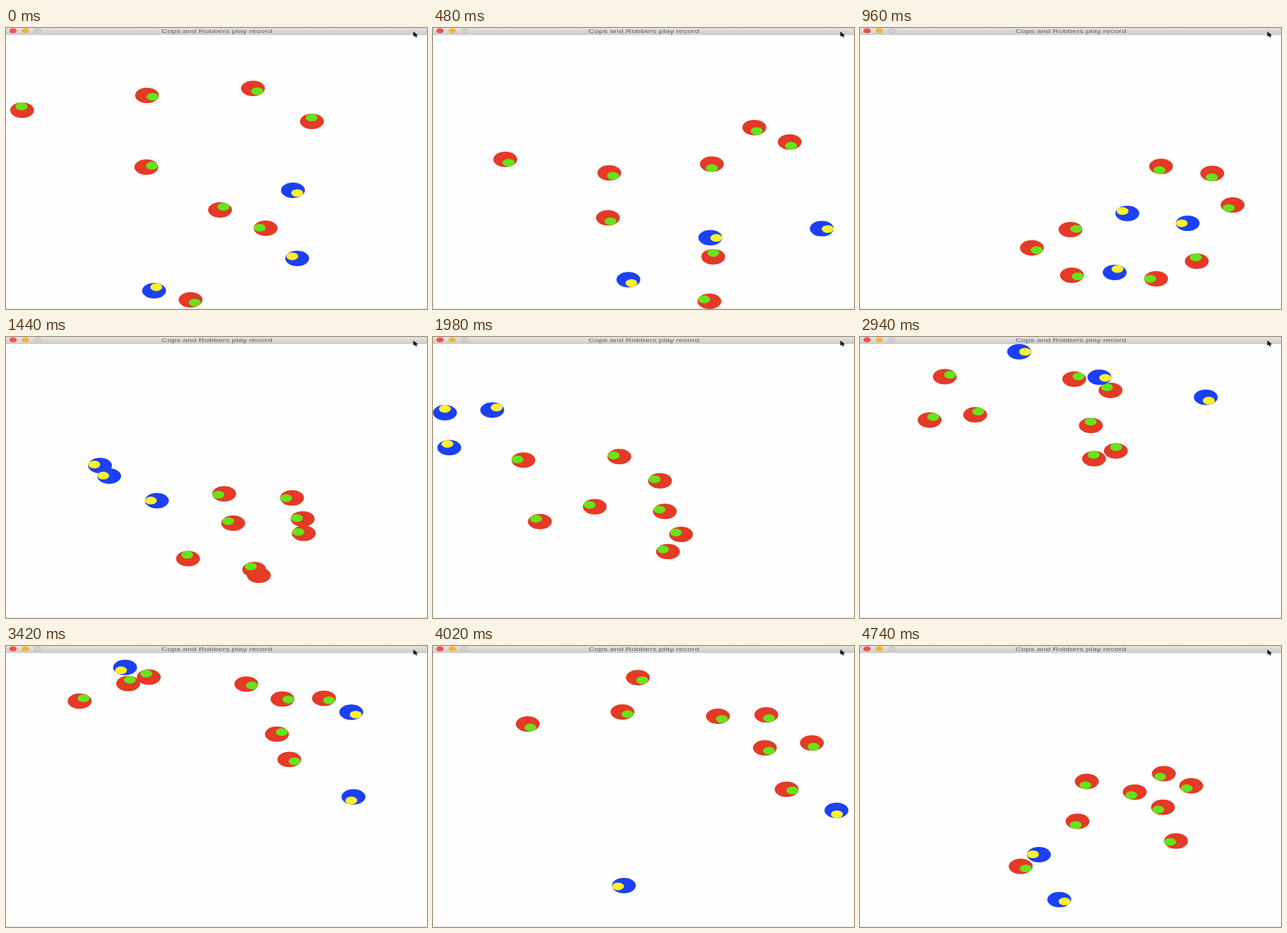
Animation, 600 px wide and 400 px high, one loop 4.8 s. Source, as an HTML page with a canvas:

```html
<!DOCTYPE html>
<html>
<head>
<meta charset="utf-8">
<title>Cops and Robbers play record</title>
<style>
html, body { margin: 0; width: 100%; height: 100%; overflow: hidden; background: #fefefe; }
canvas { display: block; }
</style>
</head>
<body>
<canvas id="stage" width="600" height="400"></canvas>
<script>
const ctx = document.getElementById('stage').getContext('2d');
const LOOP = 4800, STEP = 60, LAST = LOOP - STEP;
const RX = 17, RY = 11;

// Speeds are in body radii per millisecond.
const ROBBER_SPEED = 2 / STEP, COP_SPEED = 0.9 / STEP;
const CAUGHT_AT = 3540;

const clamp = (v, lo, hi) => Math.min(hi, Math.max(lo, v));
const unit = deg => [Math.cos(deg * Math.PI / 180), Math.sin(deg * Math.PI / 180)];
const normal = ([x, y]) => {
  const length = Math.hypot(x, y) || 1;
  return [x / length, y / length];
};

// Robbers run through a few poses: x, y, heading in degrees.
const ROBBER_TIMES = [0, 960, 1440, 2520, 4020, LAST];
const robbers = [
  [[415, 328, 214], [381, 264, 218], [134, 183, 195], [335, 42, 355], [272, 341, 168], [284, 361, 28]],
  [[211, 374, 292], [363, 348, 300], [147, 198, 185], [140, 40, 8], [575, 234, 85], [255, 297, 185]],
  [[409, 231, 45], [467, 278, 180], [215, 233, 180], [123, 40, 335], [81, 182, 90]]
].map((poses, i) => ({
  times: ROBBER_TIMES,
  path: poses,
  headings: poses.map(pose => unit(pose[2])),
  speed: ROBBER_SPEED,
  end: i === 2 ? CAUGHT_AT : LOOP
}));

// Cubic curve through the way points, leaving each along its heading.
function positionAt({ times, path, headings, speed }, t) {
  let i = 0;
  while (i < path.length - 2 && t >= times[i + 1]) i++;
  const span = times[i + 1] - times[i];
  const u = (t - times[i]) / span, v = 1 - u;
  const blend = (axis, radius) =>
    path[i][axis] * v * v * (1 + 2 * u) + path[i + 1][axis] * u * u * (3 - 2 * u) +
    span * speed * radius * u * v * (headings[i][axis] * v - headings[i + 1][axis] * u);
  return [clamp(blend(0, RX), RX, 600 - RX), clamp(blend(1, RY), 21, 400 - RY)];
}

// Directions are measured in body radii, as the whole scene is squashed.
const direction = (from, to) => [(to[0] - from[0]) / RX, (to[1] - from[1]) / RY];

function facingNearest(point, t) {
  const ways = robbers.filter(r => t < r.end).map(r => direction(point, positionAt(r, t)));
  return normal(ways.reduce((a, b) => Math.hypot(...b) < Math.hypot(...a) ? b : a));
}

// In the last leg the flock draws together and drops, most on its left side.
const closeIn = ([x, y]) => [x + 0.4 * (370 - x), y + 250 - 0.35 * x];

// Cops know their start pose and where they gather; the chase gives the rest.
const COP_TIMES = [0, 960, 2520, 4020, LAST];
const cops = [
  [[23, 117, 264], [245, 313], [90, 180], [135, 111]],
  [[201, 96, 20], [300, 287], [158, 183], [292, 45]],
  [[352, 86, 45], [502, 207], [248, 94], [406, 100]],
  [[436, 133, 268], [531, 252], [302, 121], [540, 138]],
  [[200, 198, 340], [302, 352], [311, 238], [473, 145]],
  [[305, 259, 305], [429, 197], [73, 96], [270, 94]],
  [[370, 285, 187], [480, 332], [294, 192], [475, 98]],
  [[263, 387, 45], [422, 357], [361, 206], [504, 204]]
].map(points => {
  const path = [...points, closeIn(points[3])];
  const headings = path.map((p, i) => i ? facingNearest(p, COP_TIMES[i]) : unit(p[2]));
  return { times: COP_TIMES, path, headings, speed: COP_SPEED };
});

function robberHeading(robber, t) {
  if (t === 0) return robber.headings[0];
  return normal(direction(positionAt(robber, t - 20), positionAt(robber, Math.min(t + 20, LAST))));
}

// Cops turn with a short lag: average where they wanted to look recently.
function copHeading(cop, t) {
  const sum = [0, 0];
  for (let past = t; past >= t - 2 * STEP; past -= STEP) {
    const [dx, dy] = past <= 0 ? cop.headings[0] : facingNearest(positionAt(cop, past), past);
    sum[0] += dx;
    sum[1] += dy;
  }
  return normal(sum);
}

function ellipse(x, y, rx, ry, color) {
  ctx.fillStyle = color;
  ctx.beginPath();
  ctx.ellipse(x, y, rx, ry, 0, 0, 2 * Math.PI);
  ctx.fill();
}

function drawPlayer([x, y], [dx, dy], body, eye) {
  ellipse(x, y, RX, RY, body);
  ellipse(x + dx * RX / 2, y + dy * RY / 2, RX / 2, RY / 2, eye);
}

function drawTitleBar() {
  const shade = ctx.createLinearGradient(0, 0, 0, 10);
  shade.addColorStop(0, '#e4e4e4');
  shade.addColorStop(1, '#cbcbcb');
  ctx.fillStyle = shade;
  ctx.fillRect(0, 0, 600, 10);

  ellipse(10, 4, 5.3, 3.5, '#f0504a');
  ellipse(27.5, 4, 5.3, 3.5, '#f5b432');
  ellipse(45, 4, 5.3, 3.5, '#b8b8b8');
  ellipse(45, 4, 4.5, 2.8, '#d0d0d0');

  ctx.save();
  ctx.scale(1, RY / RX);
  ctx.font = '11.65px "Liberation Sans", Arial, sans-serif';
  ctx.textAlign = 'center';
  ctx.fillStyle = '#606060';
  ctx.fillText('Cops and Robbers play record', 300.5, 10.8);
  ctx.restore();
}

function drawPointer() {
  ctx.fillStyle = '#111';
  ctx.fill(new Path2D('M580.5 5v7.2l2.2-1.2 1.6 2.5 1.6-.5-1.3-2.4 2.8-.2z'));
}

function draw(t) {
  ctx.fillStyle = '#fefefe';
  ctx.fillRect(0, 0, 600, 400);
  ctx.fillStyle = '#ebebeb';
  ctx.fillRect(0, 399, 600, 1);
  for (const cop of cops) drawPlayer(positionAt(cop, t), copHeading(cop, t), '#e43a26', '#66e41a');
  for (const robber of robbers) {
    if (t < robber.end) drawPlayer(positionAt(robber, t), robberHeading(robber, t), '#1c40f6', '#fdf02a');
  }
  drawTitleBar();
  drawPointer();
}

function tick() {
  const t = performance.now() % LOOP;
  draw(Math.floor(t / STEP) * STEP);
  requestAnimationFrame(tick);
}
tick();
</script>
</body>
</html>
```
